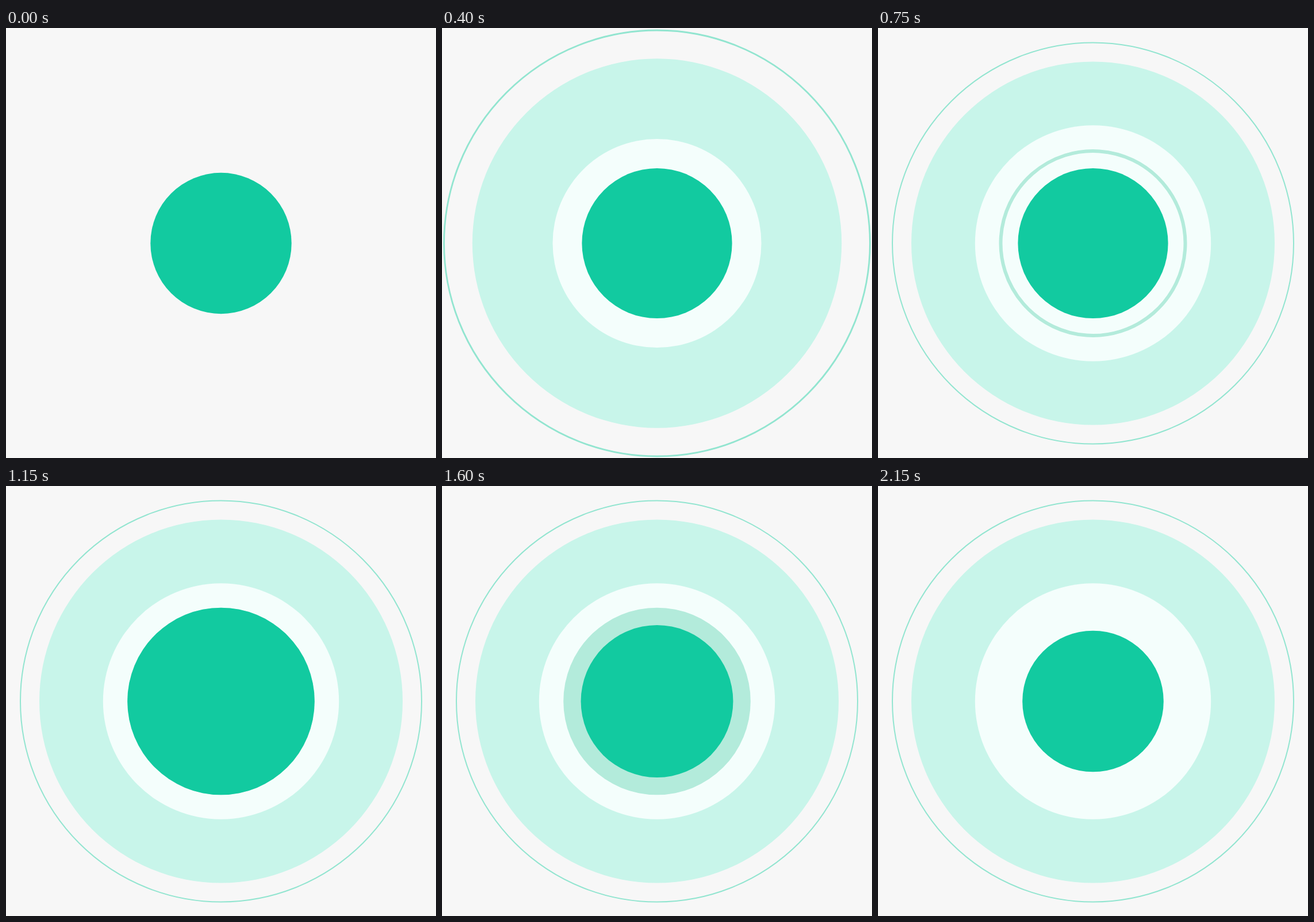
Write an HTML page that moves like this. It is 748x748 px and loops after 2.3 s.

```html
<!DOCTYPE html>
<html lang="en">
<head>
<meta charset="utf-8">
<title>Pulse</title>
<style>
  html, body { margin: 0; height: 100%; overflow: hidden; background: #f7f7f7; }
  svg { display: block; width: 748px; height: 748px; }
  #mint { fill: #c8f5ea; }
  #white { fill: #f4fefc; }
  #halo { fill: #b3ebdb; }
  #core { fill: #12caa0; }
  #ring { fill: none; stroke: #92e5d0; }
  #arc { fill: none; stroke: #b3ebdb; stroke-width: 6; }
</style>
</head>
<body>
<svg viewBox="0 0 748 748">
  <g transform="translate(374 374.5)">
    <circle id="ring"/>
    <circle id="mint"/>
    <circle id="white"/>
    <circle id="halo"/>
    <circle id="arc" r="160.5" pathLength="360" transform="rotate(-86)"/>
    <circle id="core"/>
  </g>
</svg>
<script>
  const LOOP = 2300, STEP = 50;
  const linear = p => p;
  const out = p => 1 - (1 - p) ** 3;
  const inOut = p => p * p * (3 - 2 * p);

  // Each key: [time, value, easing towards it]
  const tracks = {
    ring: [[0, 0], [50, 150, linear], [250, 378, out], [300, 380, out], [550, 353, inOut], [750, 349, out]],
    ringWidth: [[0, 2.6], [250, 2.6, linear], [550, 3, linear], [750, 2, linear]],
    mint: [[0, 0], [50, 130, linear], [250, 270, inOut], [450, 322, out], [550, 320.5, inOut], [750, 316, inOut]],
    white: [[0, 0], [50, 125, linear], [250, 170, inOut], [550, 193, linear], [750, 205.2, out]],
    arc: [[400, 0], [700, 360, linear]],
    halo: [[1850, 162.8], [2000, 131, inOut]],
    core: [[0, 122.7], [250, 130.6, out], [900, 130.6, linear], [1150, 162.8, inOut]],
    coreEnd: [[2000, 131.5], [2150, 122.8, inOut]]
  };

  function at(name, t) {
    const keys = tracks[name];
    const i = keys.findIndex(k => k[0] > t);
    if (i === 0) return keys[0][1];
    if (i < 0) return keys[keys.length - 1][1];
    const [t0, v0] = keys[i - 1], [t1, v1, ease] = keys[i];
    return v0 + (v1 - v0) * ease((t - t0) / (t1 - t0));
  }

  function coreRadius(t) {
    if (t <= 1150) return at("core", t);
    if (t >= 2000) return at("coreEnd", t);
    return 131.5 + 31.3 * Math.exp((1150 - t) / 128);
  }

  const el = id => document.getElementById(id);
  const set = (id, name, value) => el(id).setAttribute(name, value);

  function draw(t) {
    for (const id of ["ring", "mint", "white"]) set(id, "r", at(id, t));
    set("ring", "stroke-width", at("ringWidth", t));
    set("core", "r", coreRadius(t));
    set("halo", "r", t >= 1150 && t < 2000 ? at("halo", t) : 0);

    const sweep = at("arc", t);
    set("arc", "stroke-dasharray", sweep < 360 ? `${sweep} 400` : "none");
    el("arc").style.display = sweep > 0 && t < 1150 ? "" : "none";
  }

  const start = performance.now();
  function tick() {
    const t = (performance.now() - start) % LOOP;
    draw(Math.min(Math.floor(t / STEP) * STEP, 2150));
    requestAnimationFrame(tick);
  }
  tick();
</script>
</body>
</html>
```
